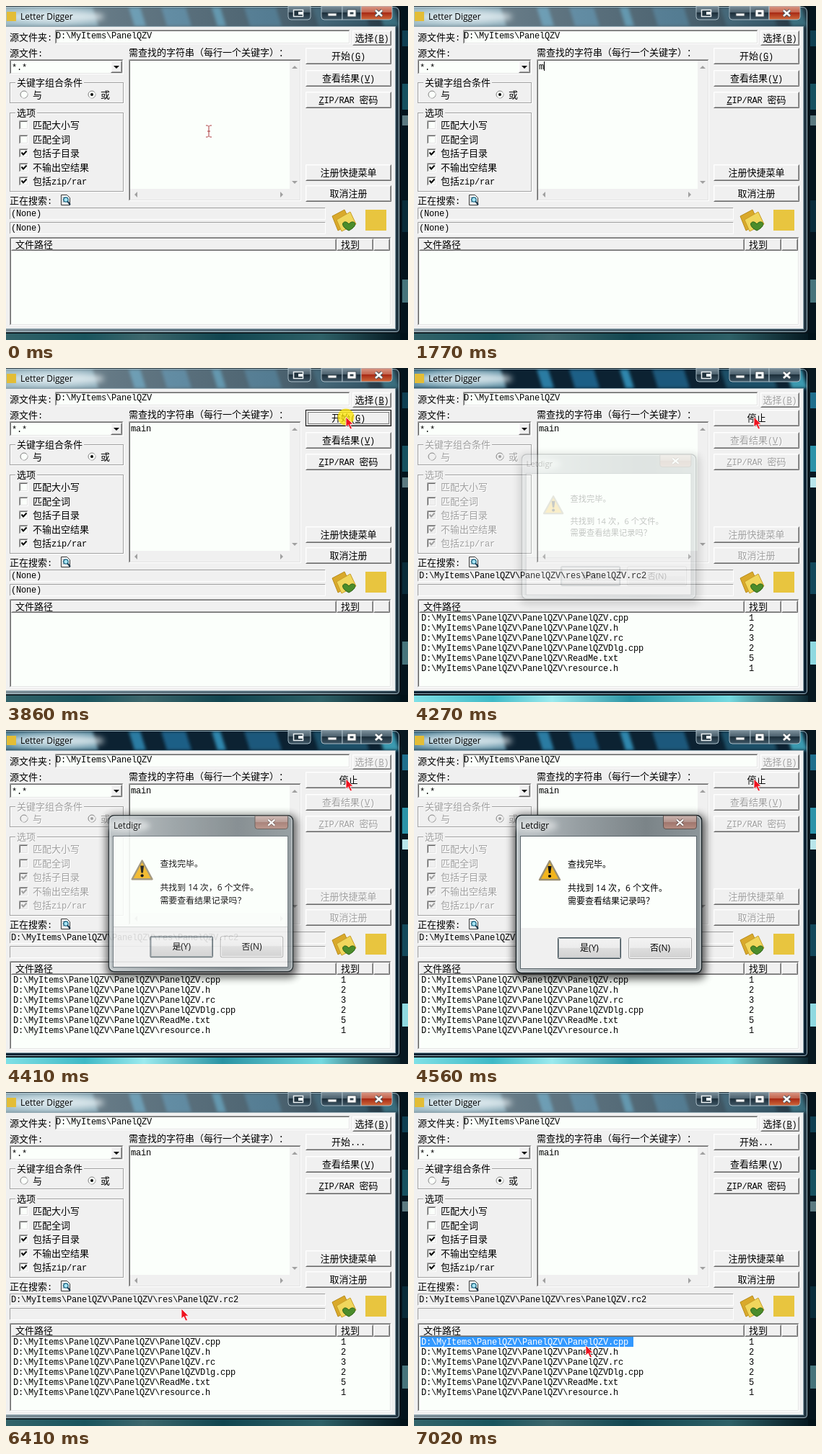
Recreate the animation shown at these times as an HTML page. Size 557x464 px, loop 8000 ms.

```html
<!DOCTYPE html>
<html lang="zh-CN">
<head>
<meta charset="utf-8">
<title>Letter Digger</title>
<style>
html, body { margin: 0; width: 100%; height: 100%; overflow: hidden; background: #0c2d38; }
svg { display: block; width: 557px; height: 464px; }
text { white-space: pre; cursor: default; text-spacing-trim: space-all; }
.a { font: 12px "Liberation Mono", monospace; letter-spacing: -.2px; }
.c { font: 13px "Noto Sans CJK SC", "Noto Sans CJK", sans-serif; }
.w { font: 12px "Open Sans", "Noto Sans CJK SC", "Noto Sans CJK", sans-serif; }
.u { text-decoration: underline; }
.m { text-anchor: middle; }
.off .d { fill: #a0a0a0; filter: drop-shadow(1px 1px 0 #fff); }
.off .k { stroke: #a0a0a0; }
.off .r { fill: #a0a0a0; }
.off .box { fill: #f0f0f0; }
.sel { fill: #fff; }
</style>
</head>
<body>
<svg id="stage" viewBox="0 0 557 464" xmlns="http://www.w3.org/2000/svg"></svg>
<script>
const LOOP = 8000;
const ROOT = 'D:\\MyItems\\PanelQZV';
const DIR = ROOT + '\\PanelQZV\\';
const HITS = [['PanelQZV.cpp', 1], ['PanelQZV.h', 2], ['PanelQZV.rc', 3],
  ['PanelQZVDlg.cpp', 2], ['ReadMe.txt', 5], ['resource.h', 1]];

// ---- drawing helpers ----
const rect = (x, y, w, h, fill, more = '') =>
  `<rect x="${x}" y="${y}" width="${w}" height="${h}" fill="${fill}" ${more}/>`;
const path = (d, fill = 'none', more = '') => `<path d="${d}" fill="${fill}" ${more}/>`;
const line = (d, color, more = '') => path(d, 'none', `stroke="${color}" ${more}`);
const group = (id, body, more = '') => `<g id="${id}" ${more}>${body}</g>`;

// "_X" underlines X; Latin and Chinese runs get their own font
const runs = s => (s.match(/_.|[ -^`-~]+|[^ -~]+/g) || []).map(r =>
  r[0] === '_' ? `<tspan class="a u">${r[1]}</tspan>`
    : `<tspan class="${r.charCodeAt(0) < 127 ? 'a' : 'c'}">${r}</tspan>`).join('');
const text = (x, y, s, cls = '', id = '') =>
  `<text x="${x}" y="${y}" class="${cls}" id="${id}">${runs(s)}</text>`;
const ui = (x, y, s, cls = '') => `<text x="${x}" y="${y}" class="w ${cls}">${s}</text>`;

const edge = (x, y, w, h, tl, br) =>
  line(`M${x + .5} ${y + h - .5}V${y + .5}H${x + w - .5}`, tl) +
  line(`M${x + .5} ${y + h - .5}H${x + w - .5}V${y + .5}`, br);
const raised = (x, y, w, h) => rect(x, y, w, h, '#f0f0f0') +
  edge(x, y, w, h, '#fff', '#696969') + edge(x + 1, y + 1, w - 2, h - 2, '#f6f6f6', '#a0a0a0');
const sunken = (x, y, w, h, fill = '#fbfffb') => rect(x, y, w, h, fill) +
  edge(x, y, w, h, '#a0a0a0', '#fff') + edge(x + 1, y + 1, w - 2, h - 2, '#696969', '#e3e3e3');
const button = (x, y, w, h, s, cls = 'm d', id = '') =>
  raised(x, y, w, h) + text(x + w / 2, y + h / 2 + 4.5, s, cls, id);
const frame = (x, y, w, h, s, sw) =>
  rect(x + 1.5, y + 1.5, w, h, 'none', 'stroke="#fff"') +
  rect(x + .5, y + .5, w, h, 'none', 'stroke="#a0a0a0"') +
  rect(13, y - 6, sw, 13, '#f0f0f0') + text(15, y + 5, s, 'd');
const check = (y, s, on) => sunken(18, y - 6, 13, 13) +
  rect(20, y - 4, 9, 9, '#fbfffb', 'class="box"') +
  (on ? line(`M21.5 ${y - .5}l2.5 3l4.5 -5`, '#000', 'stroke-width="2" class="k"') : '') +
  text(37, y + 5, s, 'd');
const radio = (x, s, on) =>
  `<circle cx="${x}" cy="123" r="5" fill="#fbfffb" stroke="#808080" class="box"/>` +
  line(`M${x - 3.5} 127a5.5 5.5 0 0 0 7.5 -7.5`, '#e3e3e3') +
  (on ? `<circle cx="${x}" cy="123" r="2" class="r"/>` : '') + text(x + 12, 128, s, 'd');
const grad = (id, stops, vertical) =>
  `<linearGradient id="${id}" x2="${vertical ? 0 : 1}" y2="${vertical ? 1 : 0}">` +
  stops.map(([o, c]) => `<stop offset="${o}" stop-color="${c}"/>`).join('') + '</linearGradient>';
const blur = (id, size) => `<filter id="${id}" x="-30%" y="-60%" width="160%" height="220%">` +
  `<feGaussianBlur stdDeviation="${size}"/></filter>`;

// ---- scene parts ----
const defs = '<defs>' +
  grad('tint', [[0, '#dbe7ea'], [.3, '#a9bdc6'], [.7, '#7f97a2'], [1, '#33454f']]) +
  grad('red', [[0, '#d99a88'], [.48, '#c4614a'], [.5, '#a82a15'], [1, '#cf6a3c']], true) +
  grad('cap', [[0, '#7f929d'], [.48, '#4a5f6c'], [.5, '#1d2f3b'], [1, '#3e5665']], true) +
  grad('gray', [[0, '#c0c8cc'], [.48, '#969fa4'], [.5, '#757f85'], [1, '#99a2a7']], true) +
  grad('dlg', [[0, '#b9c0c3'], [.35, '#959da1'], [.7, '#7b8488'], [1, '#8d969a']]) +
  grad('dimred', [[0, '#cbb5b0'], [.48, '#b3938c'], [.5, '#a0766d'], [1, '#b58d82']], true) +
  grad('face', [[0, '#f3f3f3'], [.48, '#ececec'], [.5, '#dedede'], [1, '#d0d0d0']], true) +
  grad('floor', [[0, '#7fe0e6'], [.2, '#3fb9c6'], [.35, '#9beaee'], [.55, '#2a93a3'], [.8, '#74d9e0'], [1, '#0d2630']]) +
  blur('soft', 2) + blur('blur', 4) + blur('wide', 6) + '</defs>';

const desktop = rect(0, 0, 557, 464, '#081820') +
  [[34, 22, '#1f6f8c'], [108, 36, '#2c93a8'], [152, 14, '#b9e6ea'], [270, 44, '#14495a'], [380, 32, '#8fd9e0']]
    .map(([y, h, c]) => rect(549, y, 8, h, c)).join('') +
  rect(0, 455, 546, 9, 'url(#floor)');

const caption = (id, close, fill) => group(id,
  path('M437 0H466V19H441Q437 19 437 15Z', fill, 'stroke="#a9bcc6"') +
  rect(466, 0, 26, 19, fill, 'stroke="#a9bcc6"') +
  path('M492 0H535V15Q535 19 531 19H492Z', close, 'stroke="#a9bcc6"'));

const chromeIcons =
  path('M391 0H422V15Q422 19 418 19H395Q391 19 391 15Z', 'url(#cap)', 'stroke="#a9bcc6"') +
  rect(398.5, 5.5, 13, 9, '#22343f', 'stroke="#eef4f6" stroke-width="1.5"') + rect(405, 8, 6, 4, '#eef4f6') +
  rect(446, 10, 12, 4, '#fff', 'stroke="#45525a"') +
  rect(475, 7, 8, 6, 'none', 'stroke="#45525a" stroke-width="5"') +
  rect(475, 7, 8, 6, 'none', 'stroke="#fff" stroke-width="3"') +
  line('M512 6l9 8M521 6l-9 8', '#45525a', 'stroke-width="4.5"') +
  line('M512 6l9 8M521 6l-9 8', '#fff', 'stroke-width="2.6"');

const outline = 'M-5 0H538Q546 0 546 8V449Q546 454 541 454H-5Z';
const streaks = [[-10, 130, '#5d8ea3'], [170, 16, '#2a7ba3'], [215, 34, '#1d5f86'],
  [285, 12, '#2f86ad'], [330, 44, '#1b587c'], [425, 70, '#1c4f68'], [515, 22, '#3a9ab0']];
const win =
  path(outline, '#0c2232') +
  group('streaks', streaks.map(([x, w, c]) => path(`M${x} 2h${w}l8 26h${-w}Z`, c)).join(''), 'filter="url(#soft)"') +
  group('active', rect(546, 0, 11, 464, '#001118', 'opacity=".5"') +
    rect(0, 454, 557, 10, '#001118', 'opacity=".6"') +
    path(outline, 'url(#tint)', 'opacity=".55"')) +
  path(outline, 'none', 'stroke="#0a141a" stroke-width="1.5"') +
  line('M0 1.5H537Q544.5 1.5 544.5 9V448Q544.5 452.5 540 452.5H0', '#c4dbe3', 'opacity=".75"') +
  '<ellipse cx="70" cy="15" rx="66" ry="9" fill="#e9f2f5" opacity=".8" filter="url(#blur)"/>' +
  rect(1, 8, 13, 13, '#e3bd36') + ui(20, 19, 'Letter Digger') +
  caption('capOn', 'url(#red)', 'url(#cap)') + caption('capOff', 'url(#cap)', 'url(#cap)') + chromeIcons +
  rect(0, 28, 540, 421, '#8fa6b0') + rect(0, 29, 539, 419, '#f0f0f0');

const tri = (x, y, dx, dy) => path(dx
  ? `M${x - dx * 2} ${y - 4}l${dx * 4} 4l${-dx * 4} 4Z`
  : `M${x - 4} ${y - dy * 2}l4 ${dy * 4}l4 ${-dy * 4}Z`, '#a0a0a0');

const form =
  text(5, 48, '源文件夹:') + sunken(68, 33, 409, 20) + text(69, 45, ROOT) +
  button(480, 34, 54, 21, '选择(_B)') +
  text(5, 70, '源文件:') + sunken(5, 74, 158, 21) + text(8, 89, '*.*') +
  raised(145, 76, 16, 17) + path('M149 83h8l-4 4Z', '#000') +
  text(170, 69, '需查找的字符串（每行一个关键字）：') +
  sunken(170, 74, 239, 197) + rect(393, 76, 14, 193, '#f0f0f0') + rect(172, 254, 235, 15, '#f0f0f0') +
  tri(400, 85, 0, -1) + tri(400, 245, 0, 1) + tri(180, 262, -1, 0) + tri(382, 262, 1, 0) +
  text(173, 88, '', '', 'typed') + rect(0, 77, 1, 13, '#000', 'id="caret"') +
  frame(5, 106, 157, 28, '关键字组合条件', 95) + radio(25, '与') + radio(119, '或', true) +
  frame(5, 148, 157, 109, '选项', 30) +
  check(165, '匹配大小写') + check(185, '匹配全词') + check(204, '包括子目录', true) +
  check(224, '不输出空结果', true) + check(243, '包括zip/rar', true) +
  button(415, 58, 119, 23, '开始(_G)', 'm', 'go') +
  group('focus', rect(415.5, 58.5, 118, 22, 'none', 'stroke="#000"') +
    rect(418.5, 61.5, 112, 16, 'none', 'stroke="#000" stroke-dasharray="1 1"')) +
  button(415, 89, 119, 23, '查看结果(_V)') + button(415, 119, 119, 23, '_ZIP/RAR 密码') +
  button(415, 220, 119, 23, '注册快捷菜单') + button(415, 249, 119, 23, '取消注册') +
  text(5, 275, '正在搜索:') +
  path('M76.5 262.5h8l4 4v10h-12Z', '#fff', 'stroke="#333"') +
  line('M78 266h5M78 269h4M78 272h3', '#7a8b99') +
  '<circle cx="83" cy="269" r="3.2" fill="#a8e4f4" stroke="#17617e" stroke-width="1.3"/>' +
  line('M85.400 271.600l3.600 4.400', '#17364a', 'stroke-width="2"') +
  [280, 300].map(y => rect(5, y, 438, 17, '#f0f0f0') + edge(5, y, 438, 17, '#a0a0a0', '#fff')).join('') +
  text(7, 292, '', '', 'stat1') + text(7, 312, '', '', 'stat2') +
  path('M452 292l17 -9l9 19l-18 10Z', '#d9a92b', 'stroke="#b88c1c"') +
  path('M458 297l19 -11l8 17l-20 10Z', '#f0d65c', 'stroke="#c99e28"') +
  path('M475 312c-12 -6 -9 -13 -4 -12q3 1 4 3q1 -2 4 -3c6 -1 8 6 -4 12Z', '#4b8c2b', 'stroke="#2c6316"') +
  rect(498, 283, 29, 29, '#e8c53f');

const rowY = i => 351 + i * 14;
const list = sunken(5, 321, 529, 123) +
  raised(7, 323, 451, 17) + raised(458, 323, 51, 17) + raised(509, 323, 23, 17) +
  text(13, 336, '文件路径') + text(464, 336, '找到') +
  rect(9, 340, 295, 14, '#3399ff', 'id="mark"') +
  HITS.map(([name, n], i) => group('row' + i,
    text(10, rowY(i), DIR + name, '', 'name' + i) + text(464, rowY(i), '' + n))).join('');

const dlgButton = (x, s, main) =>
  rect(x + .5, 288.5, 87, 29, 'url(#face)', `rx="${main ? 1 : 2}" stroke="${main ? '#3c4a52' : '#a3a3a3'}"`) +
  rect(x + 1.5, 289.5, 85, 27, 'none', `rx="1" stroke="${main ? '#8d989d' : '#fafafa'}"`) +
  ui(x + 44, 307, s, 'm');
const dialog = group('dialog',
  rect(138, 118, 266, 228, '#000', 'rx="10" opacity=".65" filter="url(#wide)"') +
  rect(141.5, 118.5, 257, 219, 'url(#dlg)', 'rx="7" stroke="#1c2529" stroke-width="1.5"') +
  rect(143, 120, 254, 216, 'none', 'rx="6" stroke="#eef3f5" opacity=".75"') +
  '<ellipse cx="169" cy="133" rx="30" ry="9" fill="#fff" opacity=".5" filter="url(#blur)"/>' +
  ui(148, 137, 'Letdigr') +
  path('M345.5 119V134Q345.5 137.5 349 137.5H388Q391.5 137.5 391.5 134V119Z', 'url(#dimred)', 'stroke="#5c5350"') +
  line('M364 124.5l9 8M373 124.5l-9 8', '#6d5550', 'stroke-width="4"') +
  line('M364 124.5l9 8M373 124.5l-9 8', '#fff', 'stroke-width="2.3"') +
  group('dlgExtra', path('M293.5 119V134Q293.5 137.5 297 137.5H320Q323.5 137.5 323.5 134V119Z', 'url(#gray)', 'stroke="#444f55"') +
    rect(301.5, 124.5, 13, 8, '#66727a', 'stroke="#fff" stroke-width="1.5"') + rect(308, 127, 6, 4, '#fff')) +
  rect(147, 147, 245, 185, '#59646a') + rect(148, 148, 243, 127, '#fcfffc') + rect(148, 275, 243, 56, '#f0f0f0') +
  path('M188 182L202 208H174Z', '#f2b51d', 'stroke="#9a8f72" stroke-width="2.4" stroke-linejoin="round"') +
  path('M185.5 189h5l-1.3 10h-2.4Z', '#111') + '<circle cx="188" cy="203" r="2.1"/>' +
  ui(213, 191, '查找完毕。') + ui(213, 224, '共找到 14 次，6 个文件。') + ui(213, 242, '需要查看结果记录吗？') +
  dlgButton(199, '是(Y)', true) + dlgButton(297, '否(N)'));

const beamShape = 'M-4 -8H-1.5L0 -6.5L1.5 -8H4M0 -6.5V6.5M-4 8H-1.5L0 6.5L1.5 8H4M-2 0H2';
const pointer =
  group('halo', '<circle r="11.5" fill="#ffe600" opacity=".75"/>') +
  group('beam', line(beamShape, '#fff', 'stroke-width="2.5"') + line(beamShape, '#a83a3a')) +
  group('arrow', path('M0 0V14L3.2 11L6 17L8.5 16L5.8 10.2H10Z', '#ee1420', 'stroke="#fff" stroke-width=".8"'));

const stage = document.getElementById('stage');
stage.innerHTML = defs + desktop + win + group('form', form) + list + dialog + pointer;

// ---- timing ----
const $ = id => document.getElementById(id);
const show = (id, on) => { $(id).style.display = on ? '' : 'none'; };
const put = (id, s) => {
  const el = $(id);
  if (el.dataset.s !== s) { el.dataset.s = s; el.innerHTML = runs(s); }
};
const clamp = v => Math.max(0, Math.min(1, v));

// time, x, y of the pointer's hot spot
const MOVES = [[0, 281, 174], [720, 281, 174], [840, 279, 169], [990, 278, 168], [1140, 270, 167],
  [3070, 270, 167], [3420, 365, 118], [3780, 471, 68], [5010, 471, 68], [5240, 465, 71],
  [5600, 465, 71], [5790, 377, 241], [6120, 243, 301], [6450, 243, 301],
  [6700, 239, 361], [6870, 238, 352], [LOOP, 238, 352]];

function pointerAt(t) {
  const i = MOVES.findIndex(m => m[0] > t);
  const [t0, x0, y0] = MOVES[i - 1], [t1, x1, y1] = MOVES[i];
  const p = (t - t0) / (t1 - t0);
  return [x0 + (x1 - x0) * p, y0 + (y1 - y0) * p];
}

function draw(t) {
  const within = (a, b) => t >= a && t < b;
  const searching = within(4040, 6410);
  const started = t >= 4040;

  const word = 'main'.slice(0, [1770, 1850, 1950, 2150].filter(k => t >= k).length);
  put('typed', word);
  $('caret').setAttribute('x', 173 + word.length * 7);
  show('caret', within(440, 990) || within(1540, 2610) || within(3070, 3620));

  $('form').setAttribute('class', searching ? 'off' : '');
  put('go', searching ? '停止' : started ? '开始...' : '开始(_G)');
  show('focus', within(3860, 4040) || within(6480, 7020));

  const found = started ? Math.floor((t - 4040) / 30) : 0;
  HITS.forEach((h, i) => show('row' + i, found > i));
  const now = found < HITS.length ? HITS[found][0] : 'res\\PanelQZV.rc2';
  put('stat1', started ? DIR + now : '(None)');
  put('stat2', started ? '' : '(None)');
  const picked = t >= 7020;
  show('mark', picked);
  $('name0').setAttribute('class', picked ? 'sel' : '');

  const idle = within(4200, 6340);
  show('active', !idle);
  show('capOn', !idle);
  show('capOff', idle);

  const p = t < 6000 ? clamp((t - 4200) / 230) : 1 - clamp((t - 6260) / 150);
  show('dialog', p > 0);
  show('dlgExtra', t >= 5640);
  $('dialog').setAttribute('opacity', p ** 1.3);
  $('dialog').setAttribute('transform',
    `translate(270 ${228 - (1 - p) * 11}) scale(${.91 + .09 * p} ${.88 + .12 * p}) translate(-270 -228)`);

  const [x, y] = pointerAt(t);
  const beam = t < 1770 || within(3070, 3860) && x < 393;
  show('beam', beam);
  show('arrow', t >= 3070 && !beam);
  show('halo', within(3860, 4040) || within(6180, 6280) || within(6870, 7020));
  for (const id of ['beam', 'arrow', 'halo']) $(id).setAttribute('transform', `translate(${x} ${y})`);
}

const start = performance.now();
function tick() {
  draw((performance.now() - start) % LOOP);
  requestAnimationFrame(tick);
}
tick();
</script>
</body>
</html>
```
